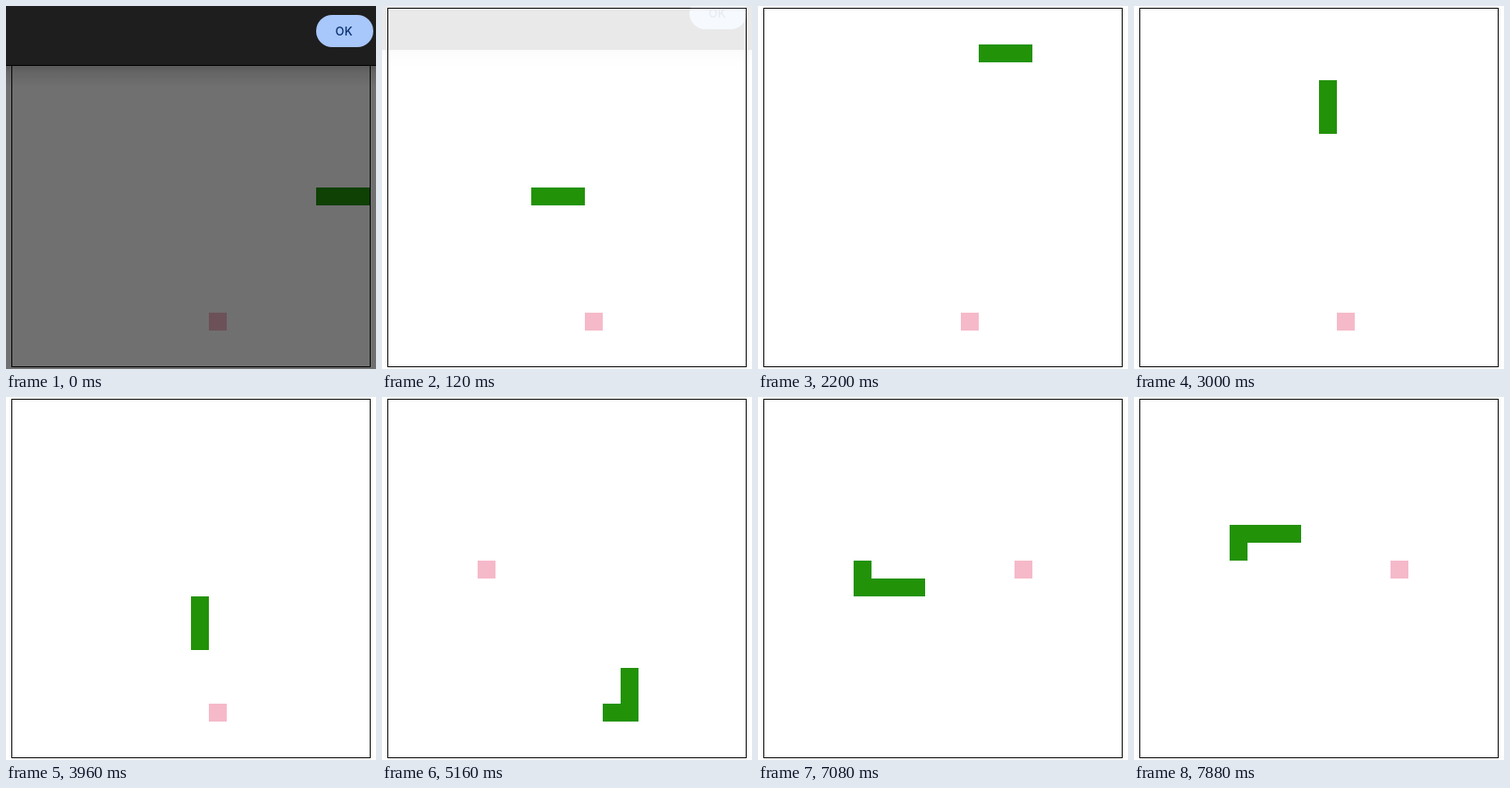
Recreate the animation shown at these times as an HTML page. Size 414x406 px, loop 8000 ms.

```html
<!DOCTYPE html>
<html lang="en">
<head>
<meta charset="utf-8">
<title>Snake</title>
<style>
  html, body { margin: 0; width: 100%; height: 100%; overflow: hidden; background: #fff; }
  svg { display: block; width: 414px; height: 406px; }
  text { font: 500 13px Inter, Roboto, sans-serif; letter-spacing: .2px; }
</style>
</head>
<body>
<svg viewBox="0 0 414 406">
  <defs>
    <linearGradient id="shade" x1="0" y1="0" x2="0" y2="1">
      <stop offset="0" stop-opacity=".2"/>
      <stop offset=".3" stop-opacity=".1"/>
      <stop offset="1" stop-opacity="0"/>
    </linearGradient>
  </defs>
  <rect width="414" height="406" fill="#fff"/>
  <rect x="6.5" y="2.5" width="401" height="401" fill="none" stroke="#000"/>
  <path id="food" fill="#f6b9ca" shape-rendering="crispEdges"/>
  <path id="snake" fill="#229208" shape-rendering="crispEdges"/>
  <rect id="scrim" width="414" height="406"/>
  <g id="dialog">
    <g id="panel">
      <rect y="67" width="414" height="24" fill="url(#shade)"/>
      <rect y="-10" width="414" height="77" fill="#1e1e1e"/>
      <rect y="66" width="414" height="1" fill="#000"/>
    </g>
    <g id="button">
      <rect x="347" y="10" width="64" height="36" rx="18" fill="#a8c7fa"/>
      <text x="378.2" y="32.7" text-anchor="middle" fill="#062e6f">OK</text>
    </g>
  </g>
</svg>
<script>
const LOOP = 8000, TICK = 120, RESTART = 120;
const DIRS = { R: [1, 0], L: [-1, 0], U: [0, -1], D: [0, 1] };

// Moves made from each start time on, one per tick.
const RUNS = {
  280: 'RRR', 680: 'R', 960: 'U', 1120: 'UU', 1400: 'UUU', 1800: 'UUL',
  2200: 'LL', 2480: 'LDD', 2880: 'DD', 3160: 'DD', 3440: 'DDD', 3840: 'DD',
  4120: 'DD', 4400: 'DDRR', 4920: 'RUU', 5320: 'UU', 5600: 'UUU', 6000: 'LLL',
  6400: 'LL', 6680: 'LL', 6960: 'LUUU', 7600: 'R', 7760: 'RR'
};
const MOVES = Object.entries(RUNS).flatMap(([start, dirs]) =>
  [...dirs].map((dir, i) => ({ at: +start + i * TICK, dir })));

const FOODS = [[11, 17], [5, 9], [14, 9]];
const FADE = [1, .66, .32, .089];
const SCRIM = [.56, .3, .1, 0];

const el = id => document.getElementById(id);
const row = (from, to, y) => Array.from({ length: to - from + 1 }, (_, i) => [from + i, y]);
const cell = ([x, y]) => `M${7 + 20 * x} ${3 + 20 * y}h20v20h-20z`;

function gameAt(t) {
  if (t < RESTART) return { body: row(17, 19, 10), food: FOODS[0] };
  const body = row(8, 10, 10);
  let eaten = 0;
  for (const { at, dir } of MOVES) {
    if (at > t) break;
    const [x, y] = body[body.length - 1];
    const head = [x + DIRS[dir][0], y + DIRS[dir][1]];
    body.push(head);
    if (String(head) === String(FOODS[eaten])) eaten++;
    else body.shift();
  }
  return { body, food: FOODS[eaten] };
}

function draw(t) {
  const { body, food } = gameAt(t);
  el('snake').setAttribute('d', body.map(cell).join(''));
  el('food').setAttribute('d', cell(food));

  const step = Math.floor(t / 40), k = step / 3;
  el('scrim').setAttribute('opacity', SCRIM[step] || 0);
  el('dialog').setAttribute('opacity', FADE[step] || 0);
  el('panel').setAttribute('transform', `translate(0 ${-18 * k})`);
  el('button').setAttribute('transform', `translate(${-3 * k} ${-20 * k})`);
}

const begin = performance.now();
function frame() {
  draw((performance.now() - begin) % LOOP);
  requestAnimationFrame(frame);
}
frame();
</script>
</body>
</html>
```
